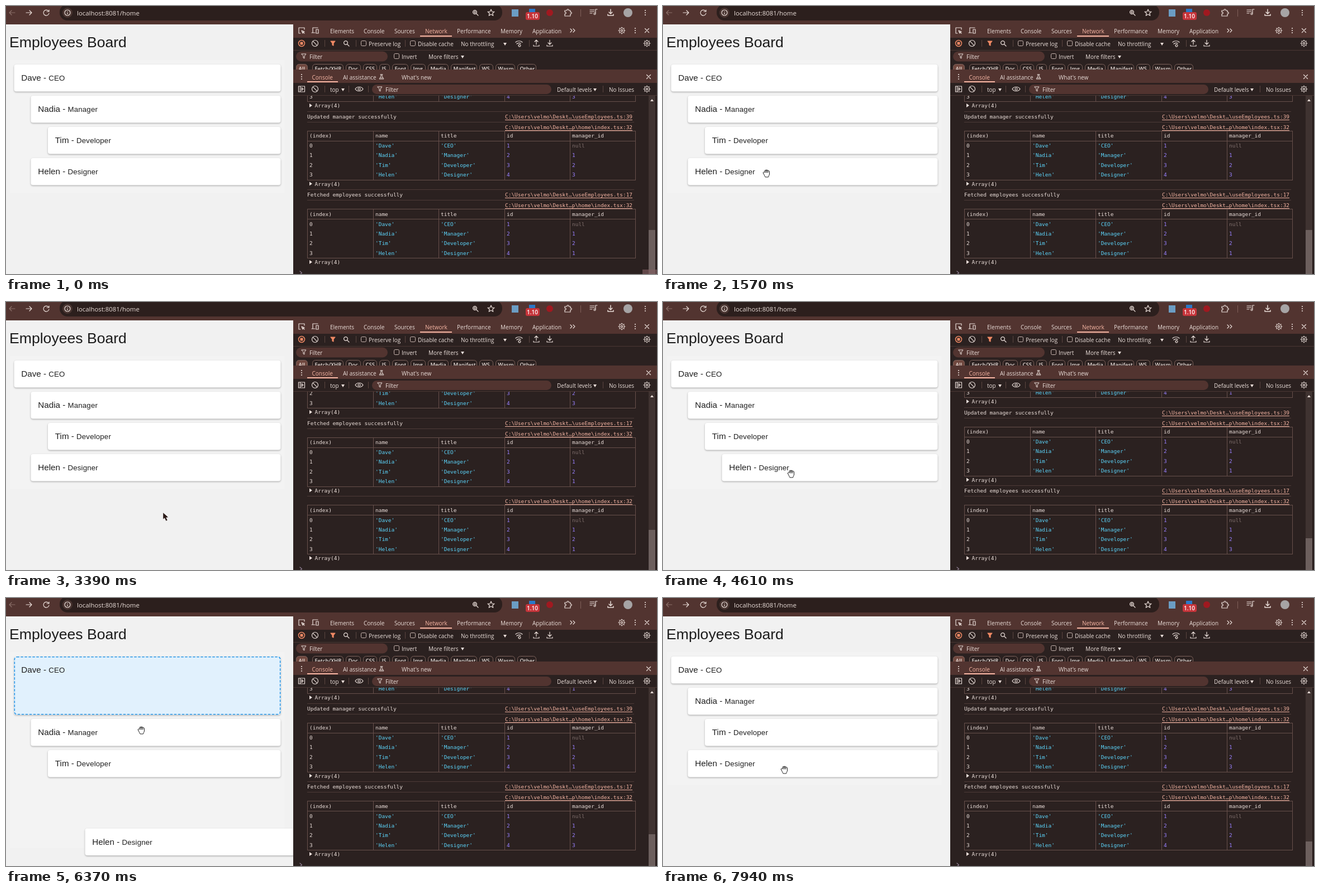
Write an HTML page with a canvas that moves like this. It is 1165 px wide and 481 px high and loops after 8000 ms.

```html
<!DOCTYPE html>
<html lang="en">
<head>
<meta charset="utf-8">
<title>Employees Board</title>
<style>
html, body { margin: 0; width: 100%; height: 100%; overflow: hidden; background: #f1f1f1; }
canvas { display: block; width: 1165px; height: 481px; }
</style>
</head>
<body>
<canvas id="stage" width="1165" height="481"></canvas>
<script>
const g = document.getElementById('stage').getContext('2d');
const LOOP = 8000;
const UI = '"Open Sans", sans-serif', PAGE = '"Liberation Sans", sans-serif', MONO = '"DejaVu Sans Mono", monospace';
const BAR = '#523430', PANEL = '#2b2120', INK = '#eaded9', ACCENT = '#f5b5a3', LINE = '#67504b';
const STAFF = [['Dave', 'CEO', 'null'], ['Nadia', 'Manager', '1'], ['Tim', 'Developer', '2'], ['Helen', 'Designer']];
const FETCHED = 'Fetched employees successfully', UPDATED = 'Updated manager successfully';
const HOME = 'C:\\Users\\velmo\\Deskt…';
const COLUMNS = [539, 657, 774, 892, 1009, 1126];

// Each log lists its newest entry first: manager of the last employee, message.
const LOGS = [
  { at: 0, thumb: 402, rows: [[1, FETCHED], [3, UPDATED], [3, '']] },
  { at: 3260, thumb: 409, rows: [[1, ''], [1, FETCHED], [3, '']] },
  { at: 3520, thumb: 424, rows: [[3, FETCHED], [1, UPDATED], [1, '']] },
  { at: 6510, thumb: 430, rows: [[3, ''], [3, FETCHED], [1, '']] },
  { at: 6640, thumb: 437, rows: [[1, FETCHED], [3, UPDATED], [3, '']] }
];

// Pointer moves: start, end, steps, keys of [progress, x, y].
const MOVES = [
  [330, 1090, 12, [[0, 1117, 478], [1, 290, 324]]],
  [1160, 1570, 6, [[0, 290, 324], [1, 185, 300]]],
  [1840, 2320, 7, [[0, 185, 300], [1, 185, 240]]],
  [2840, 3590, 10, [[0, 185, 240], [0.2, 186, 244], [0.7, 281, 378], [1, 281, 378]]],
  [4190, 4610, 7, [[0, 281, 378], [1, 229, 308]]],
  [5010, 5630, 10, [[0, 229, 308], [0.7, 182, 152], [1, 183, 148]]],
  [6090, 6710, 10, [[0, 183, 148], [0.5, 242, 237], [1, 321, 365]]],
  [7380, 7590, 4, [[0, 321, 365], [1, 214, 348]]],
  [7730, 7940, 4, [[0, 214, 348], [1, 217, 308]]]
];

const clamp = v => Math.max(0, Math.min(1, v));
const ramp = (v, a, b) => clamp((v - a) / (b - a));

function progress(t, [from, to, steps]) {
  if (t < from) return 0;
  if (t >= to) return 1;
  return (Math.floor((t - from) / (to - from) * (steps - 1) + 1e-6) + 1) / steps;
}

function track(p, keys) {
  const i = Math.max(1, keys.findIndex(k => k[0] >= p));
  const a = keys[i - 1], b = keys[i];
  const u = (1 - Math.cos(Math.PI * ramp(p, a[0], b[0]))) / 2;
  return a.slice(1).map((v, n) => v + (b[n + 1] - v) * u);
}

function pointerAt(t) {
  const move = MOVES.filter(m => t >= m[0]).pop();
  return move && track(progress(t, move), move[3]);
}

function rect(x, y, w, h, color) {
  g.fillStyle = color;
  g.fillRect(x, y, w, h);
}

function pill(x, y, w, h, r, fill, stroke) {
  g.beginPath();
  g.roundRect(x, y, w, h, r);
  if (fill) { g.fillStyle = fill; g.fill(); }
  if (stroke) { g.strokeStyle = stroke; g.lineWidth = 1; g.stroke(); }
}

function dot(x, y, r, color) {
  g.beginPath();
  g.arc(x, y, r, 0, 7);
  g.fillStyle = color;
  g.fill();
}

function text(s, x, y, size = 10, color = INK, family = UI, weight = '') {
  g.font = `${weight} ${size}px ${family}`;
  g.fillStyle = color;
  g.fillText(s, x, y + size * 0.36);
}

const mono = (s, x, y, color) => text(s, x, y, 9.47, color, MONO);

function icon(x, y, path, stroke = INK, fill, width = 1.2) {
  const p = new Path2D(path);
  g.save();
  g.translate(x, y);
  g.lineJoin = g.lineCap = 'round';
  if (fill) { g.fillStyle = fill; g.fill(p); }
  if (stroke) { g.strokeStyle = stroke; g.lineWidth = width; g.stroke(p); }
  g.restore();
}

const ring = r => `M${r} 0A${r} ${r} 0 1 1 ${-r} 0A${r} ${r} 0 1 1 ${r} 0Z`;
const GLASS = 'M2.4-1A3.4 3.4 0 1 1-4.4-1A3.4 3.4 0 1 1 2.4-1ZM1.5 1.5L5 5';
const FUNNEL = 'M-4-4H4L1 0V4L-1 3V0Z';
const CROSS = 'M-3.5-3.5L3.5 3.5M3.5-3.5L-3.5 3.5';
const DOWN = 'M-3-2H3L0 3Z';
const BAN = ring(5.5) + 'M-3.8-3.8L3.8 3.8';
const GEAR = ring(4.5) + ring(1.7) + 'M0-6V-4.6M0 6V4.6M-6 0H-4.6M6 0H4.6M-4.2-4.2L-3.3-3.3M4.2 4.2L3.3 3.3M-4.2 4.2L-3.3 3.3M4.2-4.2L3.3-3.3';
const SAVE = 'M0-6V2M-3-1L0 2L3-1M-5 3V5H5V3';
const SEND = 'M0 2V-6M-3-3L0-6L3-3M-5 3V5H5V3';
const HAND = 'M-5.5 0C-6.5-2-4-3-3-1V-4C-3-6-1-6-1-4C-1-7 1-7 1-4C1-6.5 3-6 3-4C4-5 6-4 5.5-2V2C5 4 4 5 3.5 7H-2C-3 5-4 3-5.5 0ZM-1-4V-1M1-4V-1M3-4V-1';
const FIST = 'M-4 0C-5.5-2-3-4-2-3C-2-5 0-5 1-4C2-5 3-4 3-3C5-3 5-1 4.5 1C4 4 2 5 0 4.6C-2 4.5-3.5 2-4 0Z';
const ARROW = 'M0 0V12L2.8 9.7L5.3 15L8 13.8L5.6 8.9L9.5 8.6Z';

const dots = (x, y) => [-4, 0, 4].forEach(d => dot(x, y + d, 1.1, INK));
const divider = (x, y) => rect(x, y - 6, 1, 12, '#5a4540');
const checkbox = (x, y) => pill(x - 4.5, y - 4.5, 9, 9, 2, null, '#c9b6b0');

function drawBrowser() {
  rect(0, 0, 1165, 33, BAR);
  pill(96, -3, 792, 29, 14, '#2c1f1d');
  dot(110, 12, 9, '#493531');
  icon(11, 12, 'M5 0H-5M-1-4L-5 0L-1 4', '#8b706a');
  icon(41, 12, 'M-5 0H5M1-4L5 0L1 4');
  icon(72, 12, 'M4-3A5 5 0 1 0 5 1M5-5V-2H1');
  icon(110, 12, ring(5) + 'M0 0V2.5M0-2.5V-2.2');
  text('localhost:8081/home', 127, 12.5, 11.4);
  icon(840, 12, GLASS + 'M-3-1H1M-1-3V1');
  icon(868, 12, 'M0-6L1.7-2L6-1.7L2.7 1L3.8 5.3L0 3L-3.8 5.3L-2.7 1L-6-1.7L-1.7-2Z');
  rect(905, 6, 12, 13, '#6b9dc4');
  rect(936, 5, 11, 8, '#2a78c8');
  pill(930, 11, 25, 14, 3, '#c6343a');
  text('1.10', 932, 18, 10, '#fff', UI, 600);
  dot(973, 12, 6, '#a01920');
  icon(1005, 12, 'M-5-4H-1C-2-7 3-7 2-4H5V-1C8-2 8 3 5 2V6H-5V2C-2 3-2-2-5-1Z');
  rect(1028, 6, 1, 13, '#80605a');
  icon(1051, 11, 'M-6-4H2M-6-1H2M-6 2H-2M4 3V-5H7M4 3A1.5 1.5 0 1 1 1 3A1.5 1.5 0 1 1 4 3');
  icon(1082, 12, SAVE, INK, null, 1.5);
  dot(1113, 12, 8, '#a6a4a5');
  dots(1144, 12);
}

function drawTools() {
  rect(514, 33, 651, 448, PANEL);
  rect(514, 33, 651, 24, BAR);
  icon(529, 44, 'M5-2V-5H-5V5H-2M0 0L5 2L2.6 2.6L2 5ZM3 3L5 5');
  icon(553, 44, 'M5-5H-4V4H-6H0M2-2H6V5H2Z');
  [['Elements', 580], ['Console', 640], ['Sources', 695], ['Network', 750], ['Performance', 807], ['Memory', 885], ['Application', 942]]
    .forEach(([s, x]) => text(s, x, 45, 10, s === 'Network' ? ACCENT : INK));
  rect(741, 53, 57, 2, ACCENT);
  icon(1014, 44, 'M-4-3L-1 0L-4 3M1-3L4 0L1 3');
  icon(1102, 44, GEAR);
  dots(1126, 44);
  icon(1147, 44, CROSS);

  icon(529, 67, ring(5.5), '#f08a65', null, 1.5);
  rect(526.5, 64.5, 5, 5, '#f08a65');
  icon(553, 67, BAN);
  divider(570, 67);
  icon(585, 67, FUNNEL, '#f08a65', '#f08a65');
  icon(609, 67, GLASS);
  divider(626, 67);
  checkbox(640, 67);
  text('Preserve log', 649, 68);
  divider(714, 67);
  checkbox(728, 67);
  text('Disable cache', 737, 68);
  text('No throttling', 814, 68);
  icon(893, 68, DOWN, null, INK);
  icon(918, 67, 'M-6-2C-3-5 3-5 6-2M-4 1C-2-1 2-1 3 0M-1 3H0M3 4A2 2 0 1 1 3 3.9');
  divider(936, 67);
  icon(949, 67, SEND);
  icon(973, 67, SAVE);
  icon(1147, 67, GEAR);
  rect(514, 79, 651, 1, '#4a3733');

  pill(519, 81.5, 164, 18, 9, BAR);
  icon(533, 90, FUNNEL, INK, null, 1);
  text('Filter', 543, 91);
  checkbox(699, 90);
  text('Invert', 708, 91);
  text('More filters', 756, 91);
  icon(817, 91, DOWN, null, INK);

  [['All', 519, 21], ['Fetch/XHR', 548, 56], ['Doc', 608, 27], ['CSS', 639, 25], ['JS', 668, 19], ['Font', 691, 29], ['Img', 724, 27],
    ['Media', 755, 37], ['Manifest', 796, 47], ['WS', 847, 25], ['Wasm', 876, 35], ['Other', 915, 34]].forEach(([s, x, w]) => {
    pill(x + .5, 104.5, w - 1, 17, 5, s === 'All' ? '#70483f' : null, '#7d625b');
    text(s, x + 4.5, 112.5, 9.5, INK, UI, 600);
  });

  rect(514, 114, 651, 24, BAR);
  dots(529, 127);
  text('Console', 547.5, 128, 10, ACCENT);
  rect(539, 135, 55, 2, ACCENT);
  text('AI assistance', 603, 128);
  icon(672, 127, 'M-2-4H2M-1-4V-1L-4 4H4L1-1V-4M-2 2H2', INK, null, 1);
  text("What's new", 708, 128);
  icon(1150, 127, CROSS);

  rect(514, 138, 651, 23, PANEL);
  icon(529, 149, 'M-5.5-5H5.5V5H-5.5ZM-2.5-5V5M0-2.5L3 0L0 2.5Z');
  icon(553, 149, BAN);
  divider(570, 149);
  text('top', 580, 150);
  icon(603, 150, DOWN, null, INK);
  divider(613, 149);
  icon(632, 149, 'M-7 0C-4-5 4-5 7 0C4 5-4 5-7 0Z' + ring(2));
  divider(648, 149);
  pill(655, 141, 321, 17, 8.5, BAR);
  icon(669, 149, FUNNEL, INK, null, 1);
  text('Filter', 679, 150);
  text('Default levels', 986, 150);
  icon(1054, 150, DOWN, null, INK);
  divider(1068, 149);
  text('No Issues', 1079, 150);
  icon(1147, 149, GEAR);
  rect(514, 160, 651, 1, '#4a3733');
}

function link(s, y) {
  mono(s, 893, y, ACCENT);
  rect(893, Math.round(y + 5), 228, 1, ACCENT);
}

function drawTable(top, manager) {
  const y = Math.round(top);
  [0, 18, 88].forEach(d => rect(539, y + d, 588, 1, LINE));
  COLUMNS.forEach(x => rect(x, y, 1, 88, LINE));
  ['(index)', 'name', 'title', 'id', 'manager_id'].forEach((s, i) => mono(s, COLUMNS[i] + 4, top + 9.5, INK));
  STAFF.forEach(([name, title, boss = String(manager)], i) => {
    const cells = [i, `'${name}'`, `'${title}'`, i + 1, boss];
    const colors = [INK, '#5cd5fb', '#5cd5fb', '#9980ff', boss === 'null' ? '#7f6f6c' : '#9980ff'];
    cells.forEach((s, n) => mono(String(s), COLUMNS[n] + 4, top + 27.2 + i * 17.3, colors[n]));
  });
  icon(545, top + 95.5, 'M-2-3.5L3 0L-2 3.5Z', null, INK);
  mono('Array(4)', 552.5, top + 96, INK);
}

function drawConsole(t) {
  const log = LOGS.filter(l => t >= l.at).pop();
  g.save();
  g.beginPath();
  g.rect(514, 161, 651, 320);
  g.clip();
  let top = 364;
  log.rows.forEach(([manager, message]) => {
    drawTable(top, manager);
    link(HOME + 'p\\home\\index.tsx:32', top - 6);
    rect(539, Math.round(top - 16), 585, 1, '#4d3b38');
    if (message) {
      mono(message, 539, top - 25, INK);
      link(HOME + '\\useEmployees.ts:' + (message === FETCHED ? 17 : 39), top - 25);
      rect(539, Math.round(top - 35), 585, 1, '#4d3b38');
    }
    top -= message ? 140.5 : 121.5;
  });
  icon(528, 479, 'M-2-3L1.5 0L-2 3', '#8f7f92');
  rect(1150, 161, 12, 320, '#3f3331');
  icon(1156, 169, 'M-3 2H3L0-2Z', null, INK);
  rect(1150, log.thumb, 12, 481 - log.thumb, '#6c5f5d');
  rect(1162, 161, 3, 320, '#261b1a');
  if (t < 70) rect(1139, 473, 26, 8, 'rgba(128,94,98,.65)');
  g.restore();
}

function card(x, y, who, grow = 0, tint = 0) {
  const w = who === 3 ? (x < 50 ? 447 : 386) : 491.5 - x, h = 48.5 + grow;
  g.save();
  g.shadowColor = 'rgba(0,0,0,.3)';
  g.shadowBlur = 3;
  g.shadowOffsetY = 1.2;
  pill(x, y, w, h, 4, '#fff');
  g.restore();
  if (tint > 0) {
    g.save();
    g.globalAlpha = tint;
    pill(x, y, w, h, 4, '#e1f1fd');
    g.globalAlpha = Math.min(1, tint * 1.5);
    g.setLineDash([4.5, 2.5]);
    g.lineWidth = 1.6;
    g.strokeStyle = '#2c98e6';
    g.beginPath();
    g.roundRect(x + .8, y + .8, w - 1.6, h - 1.6, 4);
    g.stroke();
    g.restore();
  }
  const [name, title] = STAFF[who];
  text(name + ' - ', x + 12.8, y + 24, 15.2, '#1f1f1f', PAGE);
  const end = x + 12.8 + g.measureText(name + ' - ').width;
  g.letterSpacing = '0.15px';
  text(title, end, y + 24.5, 13.3, '#1f1f1f', PAGE);
  g.letterSpacing = '0px';
}

// Extra heights of the first three cards, the drop slot, and the dragged card's place.
function boardAt(t, pointer) {
  const [b, c, d, e] = [2, 3, 5, 6].map(i => progress(t, MOVES[i]));
  const s = { first: 0, second: 0, third: 0, slot: 0, x: t >= 3520 && t < 6503 ? 105.5 : 44.5, y: 273 };
  if (b > 0 && c < 0.5) {
    const lift = 300 - (b < 1 ? pointer[1] : 240);
    s.third = 56 * ramp(b, 0.4, 1);
    s.y = Math.min(273, 273 + s.third - lift);
  } else if (d > 0 && e < 0.7) {
    s.first = d <= 0.7 ? 34 * ramp(d, 0.5, 0.7) : 34 + 22 * ramp(d, 0.7, 0.9);
    s.second = track(d, [[0, 0], [0.2, 0], [0.5, 34], [0.7, 14], [0.9, 0], [1, 0]])[0];
    s.slot = track(d, [[0, 0], [0.7, 43], [1, 57]])[0];
    [s.x, s.y] = e > 0
      ? track(e, [[0, 88.5, 431], [0.5, 141.5, 413.5], [1, 141.5, 413.5]])
      : track(d, [[0, 105.5, 273], [0.2, 116, 296], [0.7, 88.5, 410], [1, 88.5, 431]]);
  }
  return s;
}

function drawPage(t, pointer) {
  const s = boardAt(t, pointer);
  g.save();
  g.beginPath();
  g.rect(0, 33, 514, 448);
  g.clip();
  rect(0, 33, 514, 448, '#f1f1f1');
  rect(7, 97, 491, 239 + s.first + s.second + s.slot, '#f3f3f3');
  text('Employees Board', 6, 64.5, 26.6, '#1c1c1c', PAGE);
  card(14.5, 105, 0, s.first, (s.first / 56) ** 2);
  card(44.5, 161 + s.first, 1);
  card(75, 217 + s.first + s.second, 2, s.third, (s.third / 56) ** 2);
  card(s.x, s.y, 3);
  g.restore();
}

function drawPointer(t, [x, y]) {
  const pressed = (t >= 1910 && t < 2910) || (t >= 5080 && t < 6230);
  if (pressed) {
    dot(x, y, 8, '#f4e63f');
    icon(x, y, FIST, '#544c12', '#f7ef63', 1);
  } else if (x < 491 && y < 322) {
    icon(x, y, HAND, '#222', '#fff', 1);
  } else {
    icon(x, y, ARROW, 'rgba(255,255,255,.55)', '#2b1a18', 0.8);
  }
}

function frame(now) {
  const t = now % LOOP;
  const pointer = pointerAt(t);
  drawPage(t, pointer);
  drawTools();
  drawConsole(t);
  drawBrowser();
  if (pointer) drawPointer(t, pointer);
}

const start = performance.now();
(function tick() {
  frame(performance.now() - start);
  requestAnimationFrame(tick);
})();
</script>
</body>
</html>
```
